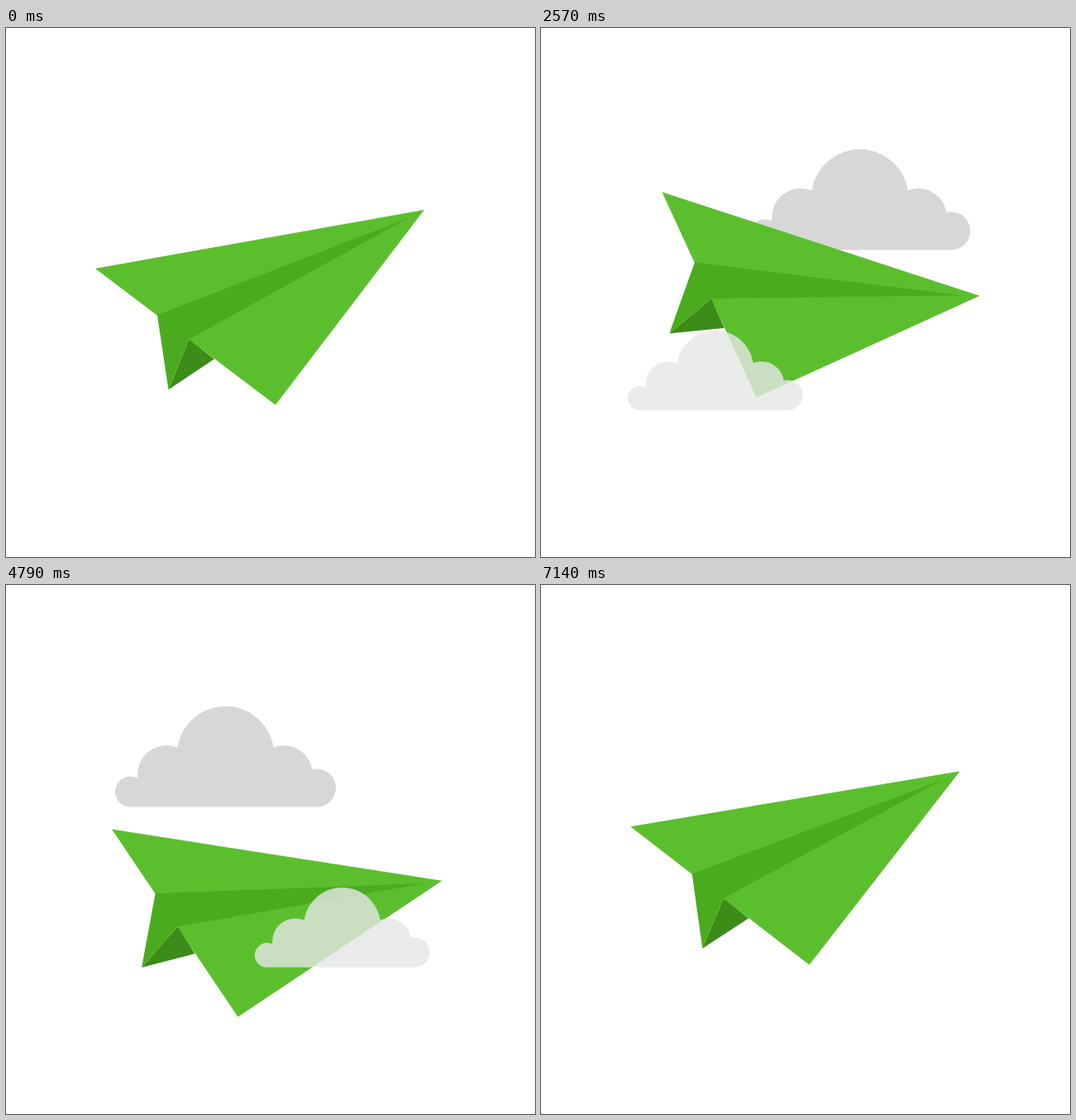
Animation of 640x640 px, one loop 7.21 s. Source, as an HTML page:

```html
<!DOCTYPE html>
<html lang="en">
<head>
<meta charset="utf-8">
<title>Paper plane</title>
<style>
  html, body { margin: 0; width: 100%; height: 100%; overflow: hidden; background: #fff; }
  svg { display: block; width: 100%; height: 100%; }
</style>
</head>
<body>
<svg viewBox="0 0 640 640">
  <defs>
    <g id="cloud">
      <circle cx="18.5" cy="103.2" r="18.5"/>
      <circle cx="62" cy="82.3" r="35"/>
      <circle cx="133.5" cy="58.7" r="58.7"/>
      <circle cx="204" cy="82" r="34.7"/>
      <circle cx="244" cy="98.7" r="23"/>
      <path d="M27 82H238.5V100H244V121.7H18.5V103H27Z"/>
    </g>
  </defs>
  <use id="farCloud" href="#cloud" fill="#d7d7d7"/>
  <g id="plane">
    <path fill="#5bbf2d" d="M108 291 506 220 326 456Z"/>
    <path fill="#3d8b18" d="M196.5 437.5 221.5 376.5 252 400.5Z"/>
    <path fill="#4bab1e" d="M183 347.3 486.5 230 221.5 376.5 196.5 437.5Z"/>
  </g>
  <use id="nearCloud" href="#cloud" fill="#e6e8e8"/>
</svg>
<script>
const LOOP = 7210;
const STEP = LOOP / 101;
const PIVOT = { x: 342.8, y: 313.5 };
const START_ANGLE = -10.1;
const DIVE_ANGLE = 18.1;

// [time, height] of the plane's flight, periodic over the loop
const flight = [
  [0, 324], [790, 288.5], [1210, 273], [1802, 286], [2570, 310.6], [3500, 340.2],
  [3930, 355.4], [4790, 384], [5500, 379.5], [6070, 363], [7140, 327]
];

const get = id => document.getElementById(id);
const plane = get('plane'), farCloud = get('farCloud'), nearCloud = get('nearCloud');
const clamp = v => Math.min(1, Math.max(0, v));

function knot(i) {
  const n = flight.length, turn = Math.floor(i / n);
  const [time, y] = flight[i - turn * n];
  return [time + turn * LOOP, y];
}

function slope(i) {
  const [t0, y0] = knot(i - 1), [t1, y1] = knot(i + 1);
  return (y1 - y0) / (t1 - t0);
}

// Smooth cubic curve through the flight points
function flightHeight(t) {
  let i = 0;
  while (knot(i + 1)[0] <= t) i++;
  const [t0, y0] = knot(i), [t1, y1] = knot(i + 1);
  const d = t1 - t0, u = (t - t0) / d, v = 1 - u;
  return v * v * ((1 + 2 * u) * y0 + u * d * slope(i))
       + u * u * ((1 + 2 * v) * y1 - v * d * slope(i + 1));
}

function planeAngle(t) {
  const dive = Math.min(1, t / (LOOP / 4), (LOOP - t) / (LOOP / 2));
  return START_ANGLE + (DIVE_ANGLE - START_ANGLE) * dive;
}

// Fade in from `start`, fade out until `end`
const fade = (t, start, end, length) =>
  clamp((t - start) / length) * clamp((end - t) / length);

function draw(t) {
  const angle = planeAngle(t);
  const y = flightHeight(t) + 60 * Math.sin(angle * Math.PI / 180);
  plane.setAttribute('transform',
    `translate(${PIVOT.x} ${y}) rotate(${angle - START_ANGLE}) translate(${-PIVOT.x} ${-PIVOT.y})`);

  farCloud.setAttribute('transform', `translate(${391.9 - 0.05432 * t} 146.8)`);
  farCloud.setAttribute('opacity', fade(t, 357, 7125, 450));

  nearCloud.setAttribute('transform', `translate(${0.0885 * t - 122.4} 366) scale(.7925)`);
  nearCloud.setAttribute('opacity', 0.8 * fade(t, 1460, 6346, 460));
}

function tick() {
  const t = performance.now() % LOOP;
  draw(Math.floor((t + 5) / STEP) % 101 * STEP);
  requestAnimationFrame(tick);
}
tick();
</script>
</body>
</html>
```
